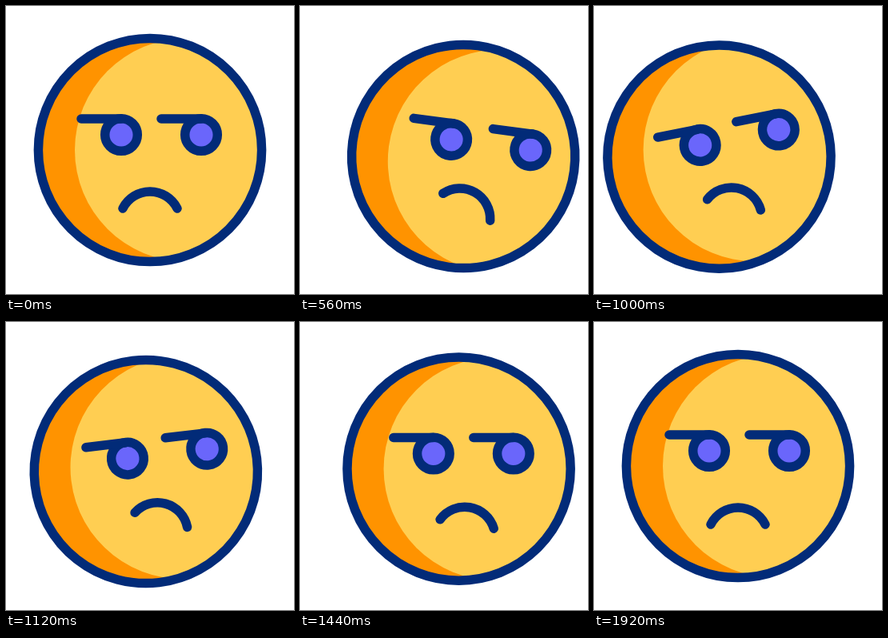
Write an HTML page that moves like this. It is 360 by 360 pixels and loops after 2000 ms.

```html
<!DOCTYPE html>
<html lang="en">
<head>
<meta charset="utf-8">
<title>Grumpy face</title>
<style>
  html, body { margin: 0; height: 100%; overflow: hidden; background: #fff; }
  svg { display: block; width: 100vw; height: 100vh; }
  .line { fill: none; stroke: #022b78; stroke-width: 11.5; stroke-linecap: round; }
  .iris { fill: #6a66fb; }
</style>
</head>
<body>
<svg viewBox="0 0 360 360">
  <defs>
    <clipPath id="disc"><circle r="139.5"/></clipPath>
    <g id="eye">
      <circle r="20.3" class="line iris"/>
      <path d="M-50 -20H0" class="line"/>
    </g>
  </defs>
  <g id="face">
    <circle r="139.5" fill="#ff9300"/>
    <g clip-path="url(#disc)"><circle cx="45.5" r="139.5" fill="#ffce52"/></g>
    <circle r="139.6" class="line"/>
    <g id="eyes">
      <use href="#eye" x="-36" y="-19"/>
      <use href="#eye" x="64" y="-19"/>
    </g>
    <path id="mouth" class="line" d="M-34 10.5A38 38 0 0 1 34 10.5"/>
  </g>
</svg>
<script>
const LOOP = 2000, STEP = 40;
const [face, eyes, mouth] = ['face', 'eyes', 'mouth'].map(id => document.getElementById(id));

// Sine ease in and out between [time, value] keys, starting from rest at time 0
const track = (rest, ...keys) => t => {
  let [t0, from] = [0, rest];
  for (const [t1, to] of keys) {
    if (t < t1) return from + (to - from) * (1 - Math.cos(Math.PI * (t - t0) / (t1 - t0))) / 2;
    [t0, from] = [t1, to];
  }
  return from;
};

const faceX = track(180, [560, 204.2], [1000, 156.5], [1280, 203.7], [1800, 180]);
const faceY = track(180, [560, 188], [1000, 188.6], [1280, 184.5], [1800, 180]);
const faceTurn = track(0, [300, 15.8], [1000, -11.2], [1280, 0]);
const eyesX = track(0, [280, 19.2], [1150, 15.2], [1600, 0]);
const mouthX = track(0, [240, 28.6], [760, 10.5], [1000, 10.5], [1280, 23.7], [1600, 0]);
const mouthY = track(62.5, [240, 52.5], [1200, 52.5], [1620, 62.5]);
const mouthTurn = track(0, [370, 22.3], [1200, 22.3], [1640, 0]);

function place(el, x, y, turn) {
  el.setAttribute('transform', `translate(${x} ${y}) rotate(${turn})`);
}

const start = performance.now();
function tick() {
  const t = Math.floor((performance.now() - start) % LOOP / STEP) * STEP;
  place(face, faceX(t), faceY(t), faceTurn(t));
  place(eyes, eyesX(t), 0, 0);
  place(mouth, mouthX(t), mouthY(t), mouthTurn(t));
  requestAnimationFrame(tick);
}
tick();
</script>
</body>
</html>
```
